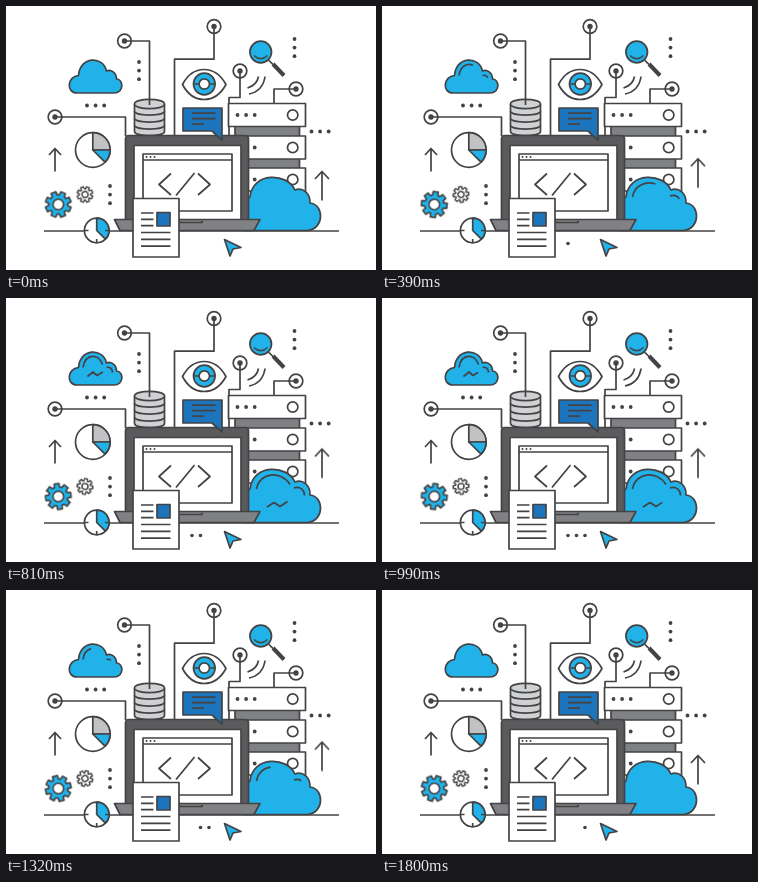
Animation of 370 by 264 pixels, one loop 1830 ms. Source, as an HTML page:

```html
<!DOCTYPE html>
<html lang="en">
<head>
<meta charset="utf-8">
<title>Connected workspace</title>
<style>
  html, body { margin: 0; width: 100%; height: 100%; overflow: hidden; background: #fff; }
  svg { display: block; width: 370px; height: 264px; }
  .ink { stroke: #434345; stroke-width: 1.7; fill: none; stroke-linejoin: round; }
  .white { fill: #fff; }
  .cyan { fill: #20b2e9; }
  .blue { fill: #1c75bc; }
  .gray { fill: #808184; }
  .silver { fill: #d0d1d3; }
  .ash { fill: #c1c2c4; }
  .dark { fill: #5b5b5d; }
  .dot { fill: #434345; stroke: none; }
  .thin { stroke-width: 1.4; }
  .thick { stroke-width: 4; }

  .lift { animation: lift 1830ms infinite; }
  @keyframes lift {
    0% { transform: translateY(0); animation-timing-function: ease-out; }
    30%, 65% { transform: translateY(-14.5px); animation-timing-function: ease-in; }
    98%, 100% { transform: translateY(0); }
  }

  /* Three tooth steps per loop close seamlessly. */
  .spin { animation: spin 1830ms linear infinite; }
  .back { animation-direction: reverse; }
  @keyframes spin {
    from { transform: rotate(22.5deg); }
    to { transform: rotate(157.5deg); }
  }

  .trail { animation: trail 1830ms step-end infinite; }
  .trail:nth-child(1) { animation-delay: -1525ms; }
  .trail:nth-child(2) { animation-delay: -1220ms; }
  .trail:nth-child(3) { animation-delay: -915ms; }
  @keyframes trail {
    0% { opacity: 1; }
    50% { opacity: 0; }
  }

  .curl, .wave { fill: none; stroke-dasharray: 1 3; stroke-dashoffset: 1.01; }
  .curl { animation: curl 1830ms linear infinite; }
  .wave { animation: wave 1830ms linear infinite; }
  @keyframes curl {
    0%, 80%, 100% { stroke-dashoffset: 1.01; }
    31%, 64% { stroke-dashoffset: 0; }
  }
  @keyframes wave {
    0%, 32%, 72%, 100% { stroke-dashoffset: 1.01; }
    43.5%, 53% { stroke-dashoffset: 0; }
  }
</style>
</head>
<body>
<svg viewBox="0 0 370 264">
  <defs>
    <g id="node">
      <circle class="ink white" r="6.8"/>
      <circle class="dot" r="2.7"/>
    </g>
    <g id="row">
      <circle class="dot" r="1.9"/>
      <circle class="dot" cx="8.6" r="1.9"/>
      <circle class="dot" cx="17.2" r="1.9"/>
    </g>
    <g id="server">
      <rect class="ink white" x="222.5" width="77" height="23"/>
      <circle class="ink white" cx="286.7" cy="11.5" r="5.2"/>
      <use href="#row" x="231.5" y="11.5"/>
    </g>
  </defs>

  <!-- ground and clock -->
  <path class="ink" d="M38 225H333"/>
  <g class="ink">
    <circle class="white" cx="90.7" cy="224.5" r="12.3"/>
    <path class="cyan" d="M90.7 224.5V212.2A12.3 12.3 0 0 1 99.4 233.2Z"/>
    <path d="M79 224.5H82.5M99 224.5H102.5M90.7 233V236.5"/>
  </g>

  <!-- database -->
  <g class="ink silver">
    <path d="M128.5 98V125.5C129 131 158 131 158.5 125.5V98"/>
    <path d="M128.5 105C129 110.5 158 110.5 158.5 105M128.5 112C129 117.500 158 117.500 158.5 112M128.5 119C129 124.500 158 124.500 158.5 119"/>
    <ellipse cx="143.5" cy="98" rx="15" ry="4.7"/>
  </g>

  <!-- circuit lines -->
  <path class="ink" d="M118.5 35H143.5V99M208 20.5V53.2H168.5V130M49 111H119.5V130M234 65V91.5H223V130M290 83H268V98"/>
  <use href="#node" x="118.5" y="35"/>
  <use href="#node" x="208" y="20.5"/>
  <use href="#node" x="49" y="111"/>
  <use href="#node" x="234" y="65"/>
  <use href="#node" x="290" y="83"/>
  <path class="ink" d="M118.5 35H126M208 20.5V28M49 111H57M234 65V73M290 83H282"/>

  <!-- servers -->
  <path class="ink gray" d="M229 120H293.5V131H229ZM229 152H293.5V163H229Z"/>
  <use href="#server" y="97.5"/>
  <use href="#server" y="130"/>
  <use href="#server" y="162"/>

  <!-- clouds -->
  <g class="ink">
    <path class="cyan" d="M71 87H108C118 87 118 73.5 110.5 73C110.5 66.5 105 63 100.5 65C97 49.5 74 50 72.5 69.5C61 70.5 60 87 71 87Z"/>
    <path class="curl" pathLength="1" d="M77 69.5C79 55.5 93 55 96.5 66.5"/>
    <path class="curl" pathLength="1" d="M100.5 69.5C104 68.5 106.5 71 106.5 74.5"/>
    <path class="wave" pathLength="1" d="M81.5 78.5L87 74L91 77.5L97 74"/>
    <path class="cyan" d="M238 224.5H301C319 223.5 318 198 304 197C304.5 187 296.5 181 289 184C281 166.5 247 165.5 244 191C240 193 236 198 236 204Z"/>
    <path class="curl" pathLength="1" d="M250.5 191C253 174.5 275 172 284 186.5"/>
    <path class="curl" pathLength="1" d="M288 190C294 188 298.5 192 298.5 197.5"/>
    <path class="wave" pathLength="1" d="M261 209L268 204.500L274 208.500L281.500 203.500"/>
  </g>

  <!-- laptop -->
  <g class="ink">
    <path class="dark" d="M119.5 214V133Q119.5 129.5 123 129.5H239Q242.5 129.5 242.5 133V214Z"/>
    <path class="white" d="M128 214V139.5H235V214Z"/>
    <path class="white" d="M137 148H226V205H137ZM137 154H226"/>
    <path d="M165 167.5L153 178.5L165 189M188.500 167L170 189.500M192 167.5L204 178.5L192 189"/>
    <path class="gray" d="M108.5 213.5H254L248 224.5H114Z"/>
    <path d="M166 214.5V216.5H196V214.5"/>
  </g>
  <g class="dot">
    <circle cx="140.5" cy="151" r="1"/>
    <circle cx="144.5" cy="151" r="1"/>
    <circle cx="148.5" cy="151" r="1"/>
  </g>

  <!-- document -->
  <g class="ink">
    <path class="white" d="M127 192.5H173V251H127Z"/>
    <path class="blue" d="M151 206.5H164V220H151Z"/>
    <path d="M135 207H147.5M135 213.3H147.5M135 219.6H147.5M135 226.5H164.5M135 233.3H164.5M135 240.2H164.5"/>
  </g>

  <!-- eye, message, search -->
  <g class="ink">
    <path class="white" d="M176.5 78.5C187 58.5 209 58.5 220 78.5C209 98.5 187 98.5 176.5 78.5Z"/>
    <circle class="cyan" cx="198.3" cy="78" r="10.8"/>
    <circle class="white" cx="198.3" cy="78" r="5.2"/>
    <path d="M187.5 78H193M203.5 78H209"/>
    <path class="blue" d="M177 102H216V134L206 125H177Z"/>
    <path d="M186 107.2H209.5M186 112.7H209.5M186 118.2H198"/>
    <circle class="cyan" cx="254.7" cy="46" r="10.8"/>
    <path class="thin" d="M248 49.5Q254.7 56 261.500 49.5"/>
    <path d="M262.5 54L267 58.5"/>
    <path class="thick" d="M267 58L278 69.5"/>
    <path d="M252.5 70.5Q251 79 241.5 82M259 70.5Q257 85 243 88"/>
  </g>

  <!-- pie -->
  <g class="ink">
    <circle class="white" cx="86.8" cy="144" r="17.3"/>
    <path class="ash" d="M86.8 144V126.7A17.3 17.3 0 0 1 104.1 144Z"/>
    <path class="cyan" d="M86.8 144H104.1A17.3 17.3 0 0 1 99 156.2Z"/>
  </g>

  <!-- gears -->
  <g transform="translate(52.3 198.5)"><g class="spin ink">
    <path class="cyan" data-gear="13 9.6"/>
    <circle class="white" r="5.3"/>
  </g></g>
  <g transform="translate(79 188.5)"><g class="spin back ink">
    <path class="white thin" data-gear="7.9 5.7"/>
    <circle class="white thin" r="3"/>
  </g></g>

  <!-- arrows -->
  <path class="ink" d="M49 165.5V142.5M43 149L49 142.5L55 149"/>
  <path class="ink lift" d="M316 194.5V165.5M309 173L316 165.5L323 173"/>

  <!-- dots -->
  <use href="#row" x="81" y="99.5"/>
  <use href="#row" x="305.5" y="125.5"/>
  <use href="#row" transform="translate(133 56) rotate(90)"/>
  <use href="#row" transform="translate(288.5 33) rotate(90)"/>
  <use href="#row" transform="translate(104 180) rotate(90)"/>

  <!-- pointer and its trail -->
  <path class="ink cyan" d="M218.5 233.5L235 241.5L227 243L224 250Z"/>
  <g class="dot">
    <circle class="trail" cx="186" cy="237.5" r="1.8"/>
    <circle class="trail" cx="194.5" cy="237.5" r="1.8"/>
    <circle class="trail" cx="203" cy="237.5" r="1.8"/>
  </g>
</svg>
<script>
  // Eight-toothed outline: each tooth is a pair of outer points between inner ones.
  function gearPath(outer, inner) {
    const corners = [[-0.28, inner], [-0.19, outer], [0.19, outer], [0.28, inner]];
    const points = [];
    for (let tooth = 0; tooth < 8; tooth++) {
      for (const [shift, radius] of corners) {
        const angle = tooth * Math.PI / 4 + shift;
        points.push(`${(radius * Math.cos(angle)).toFixed(2)} ${(radius * Math.sin(angle)).toFixed(2)}`);
      }
    }
    return `M${points.join("L")}Z`;
  }

  for (const gear of document.querySelectorAll("[data-gear]")) {
    gear.setAttribute("d", gearPath(...gear.dataset.gear.split(" ").map(Number)));
  }
</script>
</body>
</html>
```
